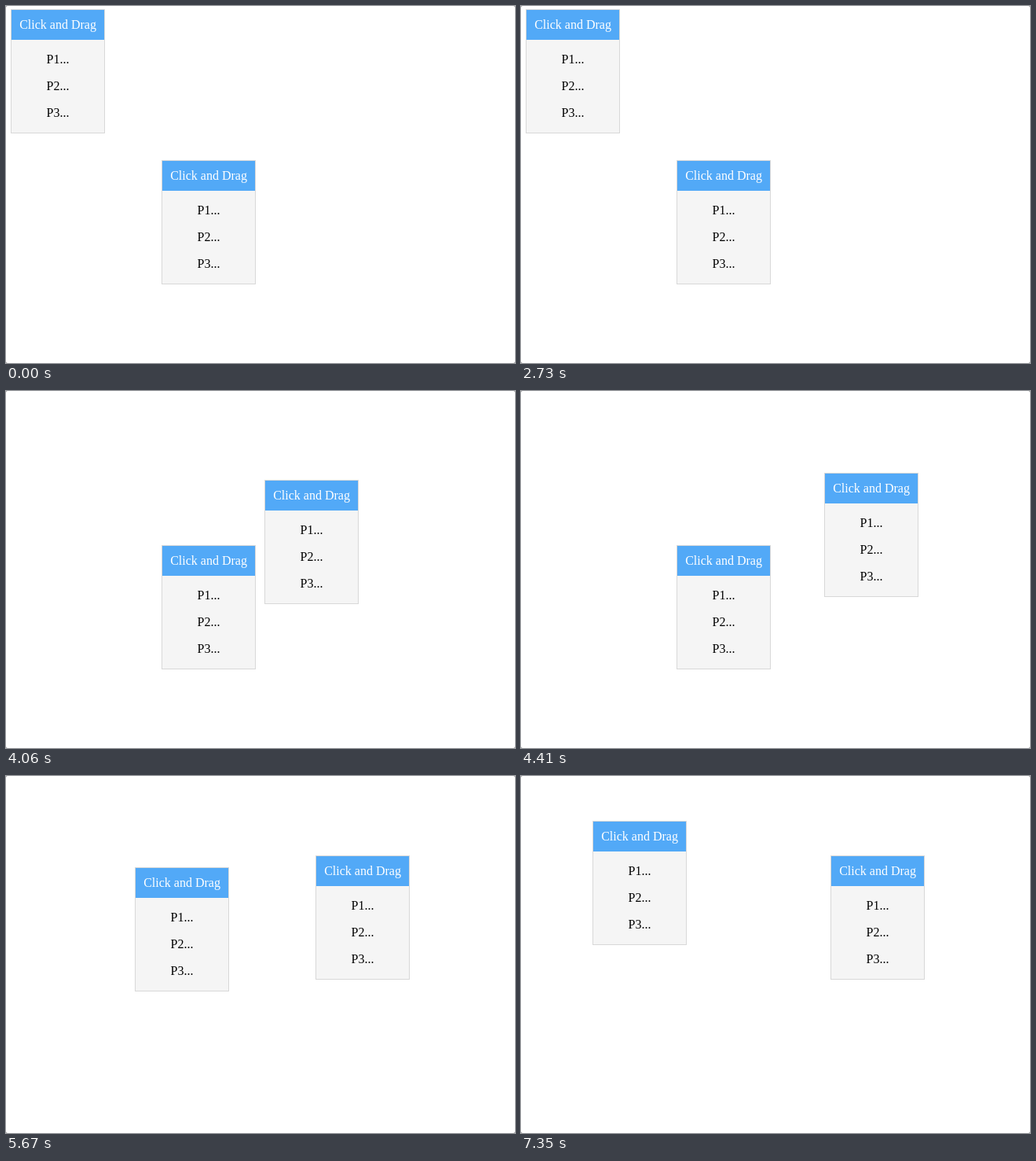
An HTML page that plays this animation: 648 px wide and 454 px high, repeating every 7630 ms.

```html
<!DOCTYPE html>
<html lang="en">
<head>
<meta charset="utf-8">
<title>Draggable cards</title>
<style>
  html, body { margin: 0; width: 100%; height: 100%; overflow: hidden; background: #888; }
  #stage { position: absolute; inset: 0; overflow: hidden; background: #fff; border-radius: 2px; }
  .card {
    position: absolute; left: 0; top: 0; box-sizing: border-box;
    width: 120px; height: 158px; border: 1px solid #d8d8d8; background: #f5f5f5;
    font: 16px/18px "Liberation Serif", "Times New Roman", serif;
    text-align: center; white-space: nowrap; color: #000;
  }
  .card header { padding: 10px 0; background: #52a9f7; color: #fff; }
  .card p { margin: 16px 0; }
</style>
</head>
<body>
<div id="stage"></div>
<script>
const LOOP = 7630, STEP = 70;

// Each key: time in ms, left, top
const paths = [
  [[3360, 6, 4], [3570, 74, 51], [4060, 329, 113], [4130, 349, 116], [4550, 394, 101]],
  [[5180, 198, 196], [5460, 194, 193], [5950, 119, -4], [6020, 118, -12], [6370, 91, 57]]
];

const cards = paths.map(() => {
  const card = document.createElement('div');
  card.className = 'card';
  card.innerHTML = '<header>Click and Drag</header><p>P1...</p><p>P2...</p><p>P3...</p>';
  return document.getElementById('stage').appendChild(card);
});

// Velocity at a key; the drag starts and ends at rest
function slope(keys, i, axis) {
  const a = keys[i - 1], b = keys[i + 1];
  return a && b ? (b[axis] - a[axis]) / (b[0] - a[0]) : 0;
}

// Smooth cubic through the keys
function place(keys, t, axis) {
  const last = keys.length - 1;
  if (t <= keys[0][0]) return keys[0][axis];
  if (t >= keys[last][0]) return keys[last][axis];
  const i = keys.findIndex(k => k[0] > t) - 1;
  const a = keys[i], b = keys[i + 1], span = b[0] - a[0];
  const u = (t - a[0]) / span, v = 1 - u;
  return a[axis] * (1 + 2 * u) * v * v + b[axis] * (3 - 2 * u) * u * u
    + span * u * v * (slope(keys, i, axis) * v - slope(keys, i + 1, axis) * u);
}

const start = performance.now();

function draw() {
  const elapsed = (performance.now() - start) % LOOP;
  const t = Math.floor(elapsed / STEP) * STEP;
  cards.forEach((card, i) => {
    const [x, y] = [1, 2].map(axis => Math.round(place(paths[i], t, axis)));
    card.style.left = x + 'px';
    card.style.top = y + 'px';
  });
  requestAnimationFrame(draw);
}
draw();
</script>
</body>
</html>
```
